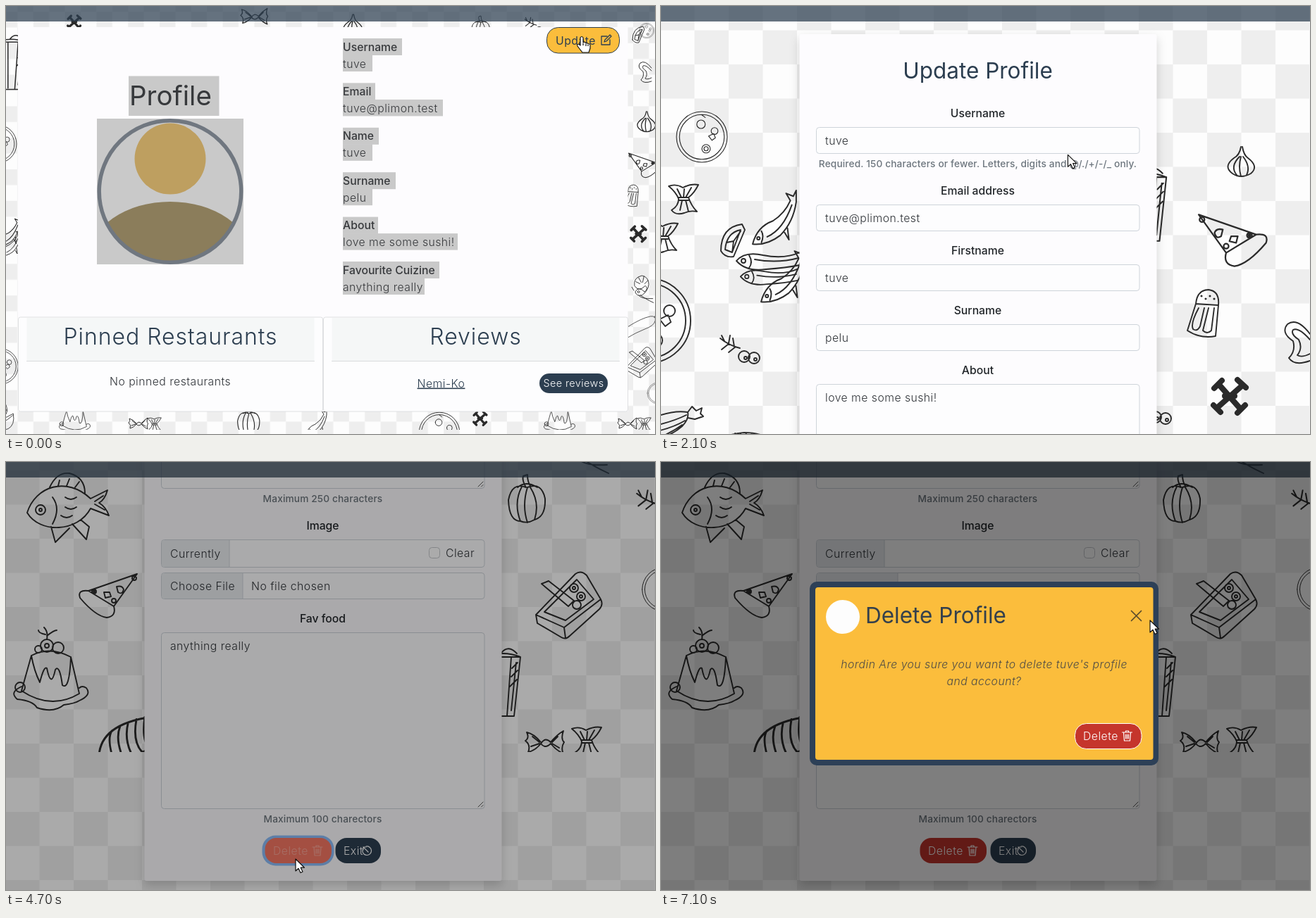
Recreate the animation shown at these times as an HTML page. Size 921 px wide and 608 px high, loop 7.2 s.

```html
<!DOCTYPE html>
<html lang="en">
<head>
<meta charset="utf-8">
<title>Profile page</title>
<style>
html, body { margin: 0; width: 100%; height: 100%; overflow: hidden; background: #fdfdfd; }
svg { display: block; width: 100vw; height: 100vh; }
text { font-family: Inter, Roboto, sans-serif; font-weight: 300; letter-spacing: .03em; white-space: pre; }
.b { font-weight: 500; letter-spacing: 0; }
.r { font-weight: 400; }
.n { font-weight: 500; letter-spacing: .01em; }
.h { font-weight: 400; letter-spacing: 0; }
.i { font-style: italic; }
.line { fill: none; stroke-linecap: round; stroke-linejoin: round; }
.doodle { fill: none; stroke: #2a2a2a; stroke-width: 1.9; stroke-linecap: round; stroke-linejoin: round; }
.card { filter: drop-shadow(0 6px 7px rgba(0, 0, 0, .17)); }
#profile { --sel: #c9c9c9; --ink: #37393c; --head: #be9f60; --body: #8b7d5b; --ring: #707780; }
#profile.active { --sel: #3367d2; --ink: #fff; --head: #32509f; --body: #1040a2; --ring: #0e3a94; }
</style>
</head>
<body>
<svg id="stage" viewBox="0 0 921 608"></svg>
<script>
const NAVY = '#2c3e50', RED = '#c5352c', YELLOW = '#fbbd3c';
const stage = document.getElementById('stage');

const ring = (x, y, r) => `M${x - r} ${y}a${r} ${r} 0 1 0 ${2 * r} 0a${r} ${r} 0 1 0 ${-2 * r} 0`;
const range = (n, f) => Array.from({ length: n }, (_, i) => f(i)).join('');
const rect = (x, y, w, h, fill, more = '') =>
  `<rect x="${x}" y="${y}" width="${w}" height="${h}" fill="${fill}" ${more}/>`;
// Text placed by the middle of its capitals.
const text = (s, x, y, { size = 15.75, cls = '', fill = '#303439', anchor = 'start', more = '' } = {}) =>
  `<text x="${x}" y="${y + size * .35}" font-size="${size}" class="${cls}" fill="${fill}" text-anchor="${anchor}" ${more}>${s}</text>`;
const line = (d, stroke, width = 1, more = '') =>
  `<path class="line" d="${d}" stroke="${stroke}" stroke-width="${width}" ${more}/>`;
const at = (x, y, body) => `<g transform="translate(${x} ${y})">${body}</g>`;

const doodles = {
  fish: 'M2 58C14 20 58 6 92 38L116 26Q112 40 104 44Q114 50 118 62L92 52C74 86 20 88 2 58ZM34 22Q44 0 62 2Q84 8 84 30M36 78L42 100L62 80M66 74L86 96L90 78L78 68M38 36Q50 52 38 74M56 36q8 6 16 0M56 50q8 6 16 0M50 62q8 6 16 0M46 20L48 12M58 20L62 10M70 22L76 14M98 42l12-8M98 46l14 8' + ring(21, 54, 7) + ring(21, 54, 2),
  pizza: 'M83 2L14 26Q-2 24 2 36Q24 62 40 64Q54 62 50 48L14 26M50 48L83 2M36 28l8 0l2 6l-8 2zM54 20q8-2 10 4q-2 8-8 4z' + ring(22, 27, 3) + ring(22, 27, 1) + ring(79, 8, 3) + ring(50, 40, 3),
  pudding: 'M14 84Q-4 92 8 102Q30 104 36 114Q60 122 74 110Q90 108 96 104Q114 96 106 86Q100 82 96 86M14 90L28 40Q54 26 84 42L96 94Q56 118 14 90M28 40Q32 62 40 78Q46 54 50 58Q56 88 62 60Q68 52 72 82Q82 90 84 42M50 17Q52 6 46 0M50 12q10-8 14-8M48 10q-10-2-10-6' + ring(50, 26, 9) + ring(66, 29, 8) + ring(38, 31, 5) + ring(50, 26, 3) + ring(12, 85, 7),
  bread: 'M2 44Q0 8 58 2Q110 2 115 50Q112 76 78 76Q30 82 2 44M22 68Q28 30 72 30Q108 32 114 52M64 96Q70 72 100 78L134 60Q140 96 118 108Q80 124 64 96M70 92Q100 96 132 66' + range(12, i => `M${20 + i * 7.6} ${58 - 28 * Math.sin(i * .25 + .1) | 0}Q${8 + i * 8.5} 26 ${14 + i * 7.8} ${18 - 15 * Math.sin(i * .28 + .1) | 0}`) + range(6, i => ring(48 + i * 10, 46 + i * 17 % 16, 1)),
  pepper: 'M26 18Q6 10 1 36Q2 66 18 66Q28 70 38 64Q54 60 53 34Q48 10 28 18M20 17Q8 40 18 66M28 18Q20 44 28 68M32 18Q46 40 38 64M26 18Q20 8 22 2L28 0Q28 10 32 16M14 18Q26 8 42 18',
  can: 'M2 62L58 4Q66-2 74 6L94 40Q98 48 92 54L50 92Q44 98 38 94L4 74ZM2 62L42 80L94 40M42 80L44 95M10 18L48 50L56 42L20 14ZM14 58L60 12L84 40L44 70Z' + ring(56, 24, 6) + ring(66, 36, 6) + ring(60, 48, 6) + ring(56, 24, 2) + ring(66, 36, 2),
  glass: 'M-22 14L-12 98H18L27 14ZM-22 14Q2 4 27 14M0 8Q10-4 22 9M14 14L8 98M21 22L14 90M-4 14V96M15 30l8-8M14 42l9-9M12 56l10-10',
  candy: 'M22 18Q12 6 2 4Q6 12 0 16Q8 22 4 32Q14 30 22 20Q28 10 36 18Q44 8 54 2Q50 14 55 18Q50 26 54 34Q44 30 36 20Q28 28 22 20M10 10L20 18M8 24L20 20M46 10L38 18M48 26L38 20',
  bow: 'M0 4Q10 0 20 6Q32 0 42 2Q36 14 28 20Q32 32 40 40Q30 38 22 42Q10 46 4 38Q14 32 14 22Q10 12 0 4M12 8L18 20M22 8L21 20M32 6L24 20M16 38L19 24M28 40L24 24M14 20H28M14 24H28',
  onion: 'M20 0Q18 12 10 16Q-6 28 8 38Q20 46 34 38Q46 28 30 16Q24 12 22 0M18 14Q4 28 14 40M20 14Q16 28 20 42M23 14Q34 28 28 40',
  lemon: 'M2 40Q2 6 32 2L36 10L20 48Q8 50 2 40M8 38Q10 14 30 10L18 42ZM20 26L10 28M20 26L18 42M20 26L30 12',
  minnow: 'M2 74Q8 50 30 42Q46 32 54 14L48 4L58 8L62 0L62 16Q58 44 40 62Q22 76 2 74M14 72Q18 62 14 56M22 64Q44 54 56 20M46 58L52 68L50 52' + ring(10, 66, 2),
  sprat: 'M92 4Q70 14 40 8Q14 2 2 16Q16 32 44 28Q72 26 92 22M20 8Q26 18 20 26M28 14Q60 20 90 12' + ring(12, 16, 3),
  olives: 'M2 8Q14 18 30 22M8 12L4 4M14 15L16 4M14 16L4 24M22 20L20 8M24 20L14 28' + ring(36, 34, 8) + ring(50, 36, 8) + ring(38, 36, 2) + ring(52, 38, 2),
  shaker: 'M14 20Q16 0 32 0Q48 2 46 22ZM14 20L2 58Q20 70 42 66L46 22M18 26Q6 48 10 56Q16 60 20 52L26 26M32 26L24 58Q30 64 36 58L40 26' + range(4, i => ring(22 + i * 6, 9 + i % 2 * 4, .6)),
  cross: 'M12 11L42 45M45 12L10 43M5 16L16 5M38 4L50 15M4 40L14 50M38 51L49 40M20 27H34',
  sausage: 'M-20 40Q30 8 62 2Q82 0 78 18Q74 36 40 48Q10 60-20 78M75 5l3-5',
  shrimp: 'M34 48Q46 38 36 30Q16 50 4 30Q0 6 26 0Q46 4 46 26Q44 46 26 58Q10 62 6 48Q16 30 34 48M8 18L20 24M16 6L24 20M32 2L28 20M44 14L34 24M22 58Q34 68 60 80M16 58Q24 70 58 68M2 44l-6-10' + ring(16, 48, 3),
  pretzel: 'M36 20Q18-4 4 6Q-6 18 12 30Q16 44 6 54Q14 66 36 58M36 28Q20 10 12 14Q8 20 20 28Q26 40 18 50Q24 54 36 48',
  wheel: ring(0, 0, 60) + ring(0, 0, 53) + ring(-2, -30, 10) + ring(10, 28, 10) + ring(10, 28, 5) + ring(30, -14, 8) + 'M16-2l12-6l4 10l-8 6zM0-52l8 6',
  wrap: 'M-20 24Q14 8 38 12Q40 22 30 32Q12 48-20 54M38 12L44 4L50 10L58 6L56 14L60 18L48 22L38 20M-20 34Q16 26 36 16M-20 42Q14 36 34 24M-10 51Q14 42 30 30',
};
// Each entry: name x y scale mirror
const scatter = list => '<g class="doodle">' + list.trim().split(';').map(entry => {
  const [name, x, y, k = 1, mirror = 1] = entry.trim().split(' ');
  const width = name === 'cross' ? ' stroke-width="8"' : '';
  return `<path d="${doodles[name]}" transform="translate(${x} ${y}) scale(${k * mirror} ${k})"${width}/>`;
}).join('') + '</g>';

const profileDoodles = scatter(`cross 86 12 .4;candy 333 2 .7;onion 478 12 .7;pepper 660 14 .5;olives 735 14 .6;
  glass 6 40 .8;wheel -12 196 .45;minnow -10 318 .5;minnow -14 300 .55;wheel -8 512 .42;bread -50 552 .45;
  lemon 888 28 .5;wheel 909 35 .18;pretzel 898 78 .5;onion 895 150 .68;pizza 930 208 .56 -1;shaker 876 254 .46;
  cross 885 311 .46;shrimp 890 383 .48;sausage 890 440 .4;can 880 484 .46;wheel 925 550 .25;
  pudding 74 558 .42;candy 174 584 .5;bow 201 584 .46;pepper 328 568 .6;minnow 424 573 .5;wheel 615 606 .48;
  cross 662 575 .4;pudding 762 558 .42;candy 868 584 .5;bow 896 584 .46`);

const formDoodles = scatter(`wheel 58 -564 .6;bow 11 -498;bow -18 -443;lemon 83 -442;minnow 128 -488 1.03;
  sprat 105 -404;minnow 140 -406 1.03;sprat 111 -380 .9;wheel -18 -303;olives 82 -286;wrap 0 -185;bread 60 -146;
  fish 28 14;pizza 103 157;pudding 8 235;bread 129 358 1.5;onion 803 -550;glass 688 -522 1.08;pizza 861 -456 1.18 -1;
  shaker 745 -347;cross 780 -223;olives 666 -200;sausage 703 -115;shrimp 795 -64;pepper 712 18;olives 893 36 1.1;
  can 750 155;wheel 934 181 .52;glass 703 263;candy 737 380;bow 803 375;pretzel 885 -304`);

const trash = (x, y, color) => at(x, y, line('M0 3H14M5 3V1H9V3M2 3L3 15H11L12 3M5 6V12M7 6V12M9 6V12', color, 1.2));

function profilePage() {
  const rows = [
    ['Username', 'tuve', 562, 520], ['Email', 'tuve@plimon.test', 524, 620], ['Name', 'tuve', 529, 520],
    ['Surname', 'pelu', 553, 520], ['About', 'love me some sushi!', 528, 641],
    ['Favourite Cuizine', 'anything really', 615, 594],
  ].map(([label, value, labelEnd, valueEnd], i) => {
    const y = 46 + i * 63.4;
    return rect(478, y, labelEnd - 478, 24, 'var(--sel)') + rect(478, y + 23.5, valueEnd - 478, 23.5, 'var(--sel)')
      + text(label, 478, y + 12, { cls: 'b', fill: 'var(--ink)' }) + text(value, 478, y + 36, { fill: 'var(--ink)' });
  }).join('');
  const panel = (x, w, title) => rect(x, 442, w, 134, '#fdfdfe', 'stroke="#dfe0e2" rx="3"')
    + rect(x + 12, 443, w - 24, 61, '#f5f7f7') + line(`M${x + 12} 504.5H${x + w - 12}`, '#d9dbdd')
    + text(title, x + w / 2, 470, { size: 32, fill: NAVY, anchor: 'middle' });
  return `<g id="profile">${rect(0, 0, 921, 608, 'url(#smallCheck)')}
    <g clip-path="url(#profileClip)">${profileDoodles}</g>
    ${rect(17, 30, 865.5, 546, '#fdfcfe')}
    ${rect(174, 99.5, 128.5, 56.5, 'var(--sel)')}${text('Profile', 175, 128, { size: 38.5, cls: 'h', fill: 'var(--ink)' })}
    ${rect(129, 160, 208, 207, 'var(--sel)')}
    <circle cx="233" cy="217" r="50.5" fill="var(--head)"/>
    <ellipse cx="233" cy="358" rx="115" ry="80" fill="var(--body)" clip-path="url(#avatar)"/>
    <circle cx="233" cy="263.5" r="100.8" fill="none" stroke="var(--ring)" stroke-width="5.5"/>
    ${rows}${panel(17.5, 432, 'Pinned Restaurants')}${panel(450.5, 432, 'Reviews')}
    ${text('No pinned restaurants', 233, 533, { anchor: 'middle' })}
    ${text('Nemi-Ko', 617.5, 536, { anchor: 'middle', fill: NAVY, more: 'text-decoration="underline"' })}
    ${rect(757, 522, 97, 28, NAVY, 'rx="14"')}${text('See reviews', 805.5, 536, { size: 14.4, fill: '#fff', anchor: 'middle' })}
    ${rect(764, 27, 110, 43, '#8bb9f6', 'rx="19" id="updateRing"')}
    ${rect(767.5, 30.5, 103, 36.5, YELLOW, `rx="16" stroke="${NAVY}" id="update"`)}
    ${text('Update', 780, 49, { cls: 'r', fill: NAVY })}
    ${at(844, 41, line('M9 2H1V14H13V7M5 10L6 7L13 0L15 2L8 9Z', NAVY, 1.3))}</g>`;
}

function formPage() {
  const box = (y, h, more = '') => rect(220.5, y, 458.5, h, '#fdfdfe', `rx="4" stroke="#ced4da" ${more}`);
  const label = (s, y) => text(s, 449.5, y, { cls: 'b', fill: '#212529', anchor: 'middle' });
  const note = (s, y) => text(s, 449.5, y, { size: 13.7, cls: 'n', fill: '#6c757d', anchor: 'middle' });
  const field = (name, value, y) => label(name, y) + box(y + 20.5, 37) + text(value, 233, y + 39);
  const area = (name, value, y) => label(name, y) + box(y + 20.5, 250) + text(value, 233, y + 39)
    + line(`M670 ${y + 268}l7-7M674.5 ${y + 268}l2.5-2.5`, '#555');
  const addon = (x, y, h) => `<path d="M${x} ${y}H225Q221 ${y} 221 ${y + 4}V${y + h - 4}Q221 ${y + h} 225 ${y + h}H${x}Z" fill="#e9ecef"/>`
    + line(`M${x} ${y}v${h}`, '#ced4da');
  return `<g id="form"><g id="scroll">${rect(0, -1400, 921, 2100, 'url(#check)')}
    <g clip-path="url(#formClip)">${formDoodles}</g>
    ${rect(196.5, -710, 507, 1305, '#fdfcfe', 'class="card" rx="3"')}
    ${text('Update Profile', 449.5, -658, { size: 31.5, fill: NAVY, cls: 'h', anchor: 'middle' })}
    ${field('Username', 'tuve', -598)}${note('Required. 150 characters or fewer. Letters, digits and @/./+/-/_ only.', -526)}
    ${field('Email address', 'tuve@plimon.test', -488)}${field('Firstname', 'tuve', -403)}${field('Surname', 'pelu', -318)}
    ${area('About', 'love me some sushi!', -233)}${note('Maximum 250 characters', 52)}
    ${label('Image', 90)}${box(110.5, 39)}${addon(317, 111, 38)}${text('Currently', 233, 130)}
    ${rect(600.5, 121.5, 15, 15, '#fff', 'rx="4" stroke="#c3c6ca"')}${text('Clear', 624, 129)}
    ${box(157.5, 37)}${addon(336, 158, 36)}${text('Choose File', 233, 176)}${text('No file chosen', 348, 176)}
    ${area('Fav food', 'anything really', 222)}${note('Maximum 100 charectors', 507)}
    ${rect(363.5, 530.5, 102, 43, '#8bbcf8', 'rx="19" id="deleteRing"')}
    ${rect(367.5, 534, 94.5, 36, RED, 'rx="16" id="delete"')}
    <g id="deleteText">${text('Delete', 379, 552, { fill: '#fff' })}${trash(435, 544, '#fff')}</g>
    ${rect(467.5, 534, 64.5, 36, NAVY, 'rx="16"')}${text('Exit', 479, 552, { fill: '#fff' })}
    ${at(505, 545, line('M6 1A6.3 6.3 0 1 1 1 6M2 6V2H6M2 2L9 9', '#fff', 1.2))}
  </g></g>`;
}

function modalBox() {
  const italic = { cls: 'i', anchor: 'middle', fill: '#4d4a45' };
  return `<g id="modal">${rect(211, 170, 495, 261, '#2d4057', 'rx="10"')}${rect(219, 178, 479.5, 245, YELLOW, 'rx="4"')}
    <circle cx="258" cy="220" r="24" fill="#fdfdfd"/>
    ${text('Delete Profile', 290, 218, { size: 31.5, cls: 'h', fill: '#34404c' })}
    ${line('M667.5 211.5l14 14m0-14l-14 14', '#594a2c', 1.7)}
    ${text("hordin Are you sure you want to delete tuve's profile", 458.5, 287, italic)}
    ${text('and account?', 458.5, 311, italic)}
    ${rect(587.5, 371.5, 94.5, 36, RED, 'rx="16" stroke="#fff"')}
    ${text('Delete', 599, 389, { fill: '#fff' })}${trash(654.5, 381, '#fff')}</g>`;
}

const checker = (id, s, x, y) => `<pattern id="${id}" width="${2 * s}" height="${2 * s}" patternUnits="userSpaceOnUse" patternTransform="translate(${x} ${y})">`
  + rect(0, 0, 2 * s, 2 * s, '#fdfdfd') + rect(0, 0, s, s, '#eeeeee') + rect(s, s, s, s, '#eeeeee') + '</pattern>';

stage.innerHTML = `<defs>${checker('check', 48.5, -1, 12)}${checker('smallCheck', 22.4, -6, 8)}
  <clipPath id="formClip">${rect(0, -1400, 921, 1812)}</clipPath>
  <clipPath id="profileClip">${rect(0, 0, 921, 602)}</clipPath>
  <clipPath id="avatar"><circle cx="233" cy="263.5" r="100"/></clipPath></defs>
  ${profilePage()}${formPage()}${rect(0, 0, 921, 22, 'rgba(44,62,80,.72)')}
  ${rect(0, 0, 921, 608, '#000', 'id="backdrop"')}${modalBox()}
  <g id="cursor" stroke-linejoin="round">
    <path id="arrow" d="M0 0V17L4 13.3L7 19.5L10 18L7.2 12.2H12.5Z" fill="#fff" stroke="#111" stroke-width="1.2"/>
    <path id="hand" d="M-2 1Q0-2 2 1V8Q5 6 6 9Q9 8 9 10Q12 9 12 12V16L10 22H1L-6 13Q-7 10-4 10L-2 12ZM2 9V12M6 10V13M9 11V13" fill="#fff" stroke="#111" stroke-width="1.2"/>
    <path id="beam" class="line" d="M-3-6Q0-6 0-4Q0-6 3-6M0-4V4M-3 6Q0 6 0 4Q0 6 3 6" stroke="#333" stroke-width="1.1"/>
  </g>`;

const el = Object.fromEntries([...stage.querySelectorAll('[id]')].map(node => [node.id, node]));
const show = (node, on) => node.setAttribute('display', on ? 'inline' : 'none');
const between = (t, a, b) => t >= a && t < b;

// Linear interpolation through [time, ...values] keys.
function track(t, keys) {
  if (t <= keys[0][0]) return keys[0].slice(1);
  const next = keys.findIndex(k => k[0] >= t);
  if (next < 0) return keys[keys.length - 1].slice(1);
  const a = keys[next - 1], b = keys[next], k = (t - a[0]) / (b[0] - a[0]);
  return a.slice(1).map((v, i) => v + (b[i + 1] - v) * k);
}

const pointer = [[0, 817, 44], [800, 818, 53], [1800, 818, 53], [2300, 417, 317], [3500, 417, 317], [3800, 406, 592],
  [4300, 411, 564], [5200, 411, 564], [5900, 634, 392], [6700, 694, 225]];
const scrolling = [[2500, 0], [2600, 60], [2700, 200], [2800, 400], [2900, 580], [3000, 700], [3100, 750]];
const dimming = [[4500, 0], [4700, .33], [4800, .5]];
const modalMotion = [[4700, -50, 0], [4800, -24, .6], [4900, -8, 1], [5000, -2, 1], [5100, 0, 1]];
const hover = [[4000, 0], [4200, 1], [4700, .9], [4900, 0]];

function draw(now) {
  const t = Math.floor(now % 7200 / 100) * 100;
  const onForm = t >= 1900, active = t >= 900;

  show(el.profile, !onForm);
  show(el.form, onForm);
  el.profile.setAttribute('class', active ? 'active' : '');
  show(el.updateRing, active);
  el.update.setAttribute('fill', active ? '#fcc65e' : YELLOW);

  el.scroll.setAttribute('transform', `translate(0 ${750 - track(t, scrolling)[0]})`);
  show(el.deleteRing, between(t, 4500, 5200));
  const [warm] = track(t, hover);
  el.delete.setAttribute('fill', `rgb(${197 + 52 * warm},${53 + 72 * warm},${44 + 60 * warm})`);
  el.deleteText.setAttribute('opacity', 1 - .75 * warm);

  el.backdrop.setAttribute('opacity', track(t, dimming)[0]);
  const [shift, alpha] = track(t, modalMotion);
  el.modal.setAttribute('transform', `translate(0 ${shift})`);
  el.modal.setAttribute('opacity', alpha);

  const hand = !onForm || between(t, 4100, 4600), beam = between(t, 2300, 3600);
  show(el.hand, hand);
  show(el.beam, beam);
  show(el.arrow, !hand && !beam);
  el.cursor.setAttribute('transform', `translate(${track(t, pointer).join(' ')})`);
}

const start = performance.now();
function tick() {
  draw(performance.now() - start);
  requestAnimationFrame(tick);
}
tick();
</script>
</body>
</html>
```
